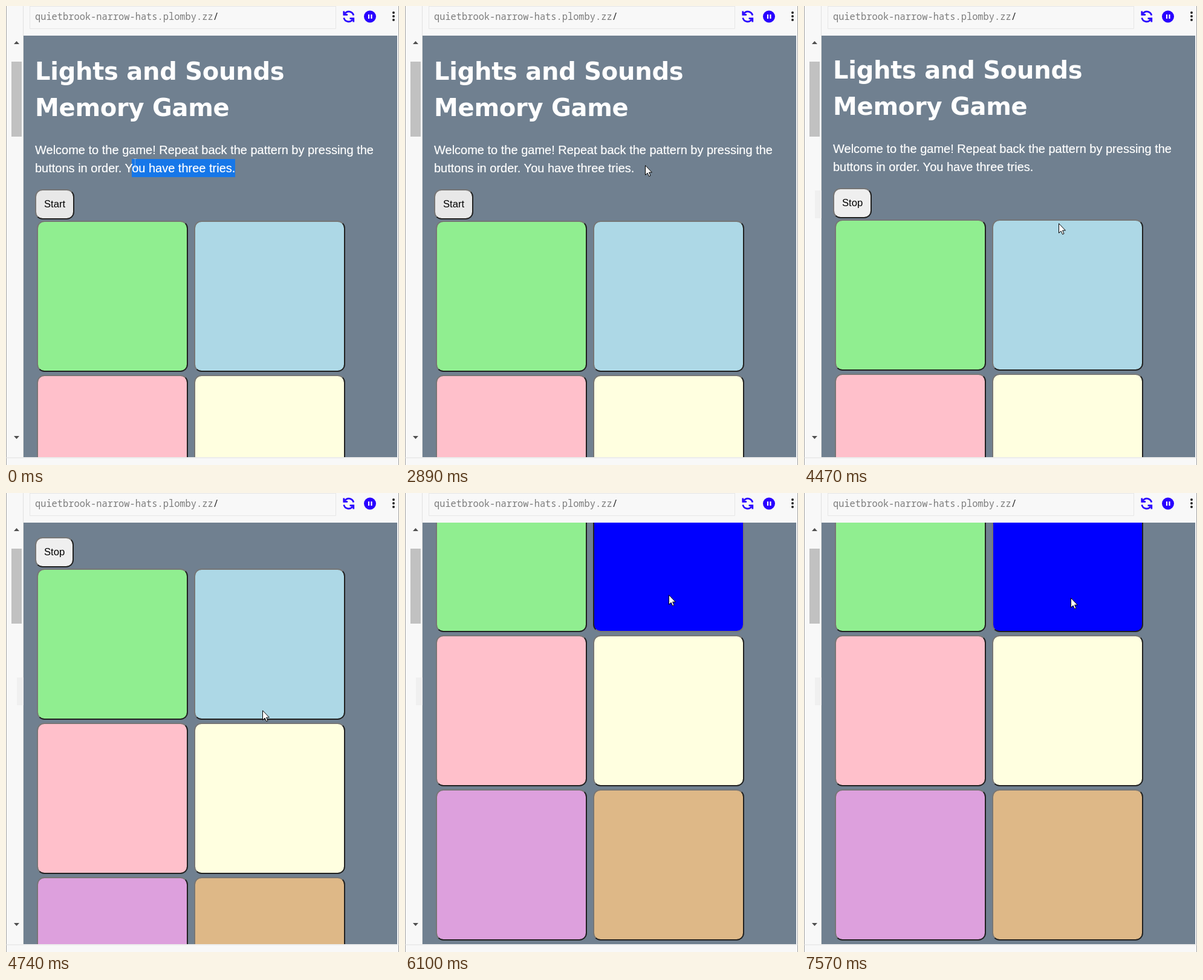
An HTML page that plays this animation: 650x759 px, repeating every 8 s.

```html
<!DOCTYPE html>
<html lang="en">
<head>
<meta charset="utf-8">
<title>Memory game</title>
<style>
  html, body { margin: 0; width: 100%; height: 100%; overflow: hidden; background: #f8f8f8; }
  svg, #view, #page, #page > * { position: absolute; margin: 0; box-sizing: border-box; }
  svg { left: 0; top: 0; }
  #view { left: 29px; top: 49px; width: 618px; height: 697px; overflow: hidden; background: #708090; }
  #page { left: -29px; width: 650px; color: #fff; white-space: nowrap; }
  h1 { left: 48px; top: 78px; font: bold 40px/60px "DejaVu Sans", Verdana, sans-serif; letter-spacing: -.27px; }
  p { left: 48px; top: 223px; font: 20px/30px "Liberation Sans", Arial, sans-serif; -webkit-text-stroke: .2px; }
  #selection { top: 253px; height: 30px; background: #1677e9; }
  .button { border: 2px solid; border-color: #767676 #212121 #212121 #767676; border-radius: 12.5px; }
  .button.pressed { border-color: #212121 #767676 #767676 #212121; }
  #toggle { left: 48px; top: 303px; height: 50px; padding: 0 13px; color: #000;
    font: 16.67px/46px "Liberation Sans", Arial, sans-serif; }
  .pad { width: 250px; height: 250px; }
</style>
</head>
<body>
<svg width="650" height="759">
  <path d="M.5 0V759M649.5 0V759" stroke="#a4a4a4"/>
  <path d="M28.5 0V746M0 747H650" stroke="#e0e0e0"/>
  <path d="M39.5 0V37.5H545.5V0M39 .5H546" fill="none" stroke="#e6e6e6"/>
  <text x="48" y="23" font-family="'Noto Sans Mono', monospace" font-size="15.35" fill="#7c7c7c">quietbrook-narrow-hats.plomby.zz<tspan fill="#222">/</tspan></text>
  <path d="M9 92h17v124H9z" fill="#c1c1c1"/>
  <path d="M13 63l4.5-5 4.5 5zM13 711l4.5 5 4.5-5z" fill="#505050"/>
  <path id="strip" d="M18 305h11v46H18z" fill="#f0f0f0"/>
  <g fill="none" stroke="#2800ff" stroke-width="2.7">
    <path id="arc" d="M574.8 15.5A8 8 0 0 0 560.5 12.5M558.8 8.5V14.3H565"/>
    <use href="#arc" transform="rotate(180 566.8 17.5)"/>
  </g>
  <circle cx="602" cy="17.5" r="10" fill="#2800ff"/>
  <path d="M600 14v7M604.5 14v7" stroke="#fff" stroke-width="2.2"/>
  <path d="M641 11v12.1" stroke="#222" stroke-width="4" stroke-linecap="round" stroke-dasharray="0 6"/>
</svg>
<div id="view">
  <div id="page">
    <div id="selection"></div>
    <h1>Lights and Sounds<br>Memory Game</h1>
    <p>Welcome to the game! Repeat back the pattern by pressing the<br>buttons in order. You have three tries.</p>
    <div id="toggle" class="button"></div>
  </div>
</div>
<svg id="cursor" width="14" height="22">
  <path id="arrow" d="M.5 .7V16.4L4.1 13.1L6.6 18.6L9 17.5L6.6 12.1H11.4Z" fill="#fff" stroke="#000"/>
  <path id="beam" d="M1 .5H6M3.5 1V15M1 15.5H6" fill="none" stroke="#dde4ec" opacity=".45"/>
</svg>
<script>
const DURATION = 8000;
const FPS = 7.5; // the picture advances in ticks of this rate
const $ = id => document.getElementById(id);
const clamp = (v, low, high) => Math.min(Math.max(v, low), high);
const within = (tick, from, to) => tick >= from && tick < to;

// Pointer moves: start tick, length in ticks, destination x and y.
const moves = [
  [0, 2, 199, 252], [5, 4, 247, 305], [13, 3, 198, 258], [16, 4, 397, 263], [22, 3, 18, 307],
  [27, 1, 54, 318], [30, 5, 424, 359], [39, 4, 386, 119], [43, 3, 436, 168], [52, 1, 441, 173]
];

function pointerAt(tick) {
  let x = 210, y = 252;
  for (const [start, length, toX, toY] of moves) {
    const eased = 1 - (1 - clamp((tick - start) / length, 0, 1)) ** 3;
    x += (toX - x) * eased;
    y += (toY - y) * eased;
  }
  return [Math.round(x), Math.round(y)];
}

function scrollAt(tick) {
  const p = clamp((tick - 33.84) * 0.267, 0, 1);
  return Math.round(375 * p * p * (3 - 2 * p));
}

// The first drag runs leftwards from the line's end, the second one rightwards.
function selectionAt(tick) {
  if (tick < 16) return [pointerAt(Math.min(tick, 2))[0] - 2, 379];
  return [197, tick < 21 ? clamp(pointerAt(tick)[0], 197, 379) : 197];
}

const pads = ['lightgreen', 'lightblue', 'pink', 'lightyellow', 'plum', 'burlywood'].map((color, i) => {
  const pad = document.createElement('div');
  pad.className = 'button pad';
  pad.style.cssText = `left:${51 + i % 2 * 260}px;top:${355 + (i >> 1) * 255}px;background:${color}`;
  return $('page').appendChild(pad);
});

function draw(tick) {
  const [x, y] = pointerAt(tick);
  const [from, to] = selectionAt(tick);
  const isBeam = tick < 7 || within(tick, 15, 21);
  $('cursor').style.transform = `translate(${x}px, ${y}px)`;
  $('arrow').style.display = isBeam ? 'none' : '';
  $('beam').style.display = isBeam ? '' : 'none';
  $('selection').style.left = from + 'px';
  $('selection').style.width = to - from + 'px';
  $('page').style.top = -49 - scrollAt(tick) + 'px';
  $('strip').style.display = tick < 25 ? 'none' : '';

  $('toggle').textContent = tick < 30 ? 'Start' : 'Stop';
  $('toggle').style.background = tick < 25 ? '#e8e8e8' : '#efefef';
  $('toggle').classList.toggle('pressed', tick === 29);

  const pressed = within(tick, 46, 49);
  const lit = within(tick, 37, 44) || pressed || tick >= 57;
  pads[1].style.background = lit ? 'blue' : 'lightblue';
  pads[1].classList.toggle('pressed', pressed);
}

const start = performance.now();
function frame() {
  const time = (performance.now() - start) % DURATION;
  draw(Math.round(time / 1000 * FPS));
  requestAnimationFrame(frame);
}
frame();
</script>
</body>
</html>
```
